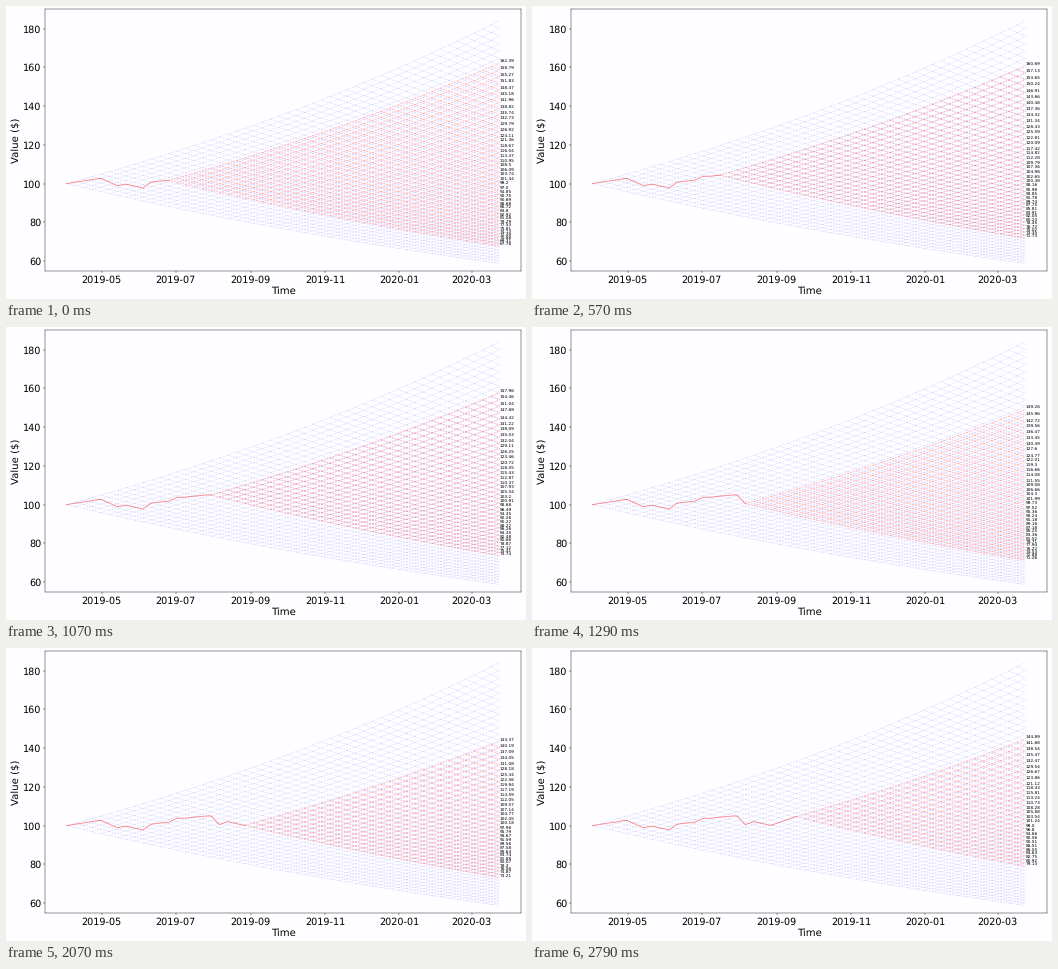
A matplotlib script that plays this animation: 520x293 px, repeating every 3 s.

```python
import numpy as np
import matplotlib.pyplot as plt
from matplotlib.animation import FuncAnimation
from matplotlib.collections import LineCollection

W, H, DPI = 520, 293, 37.5
WEEKS, FIRST = 51, 12
DRIFT = 0.04 / WEEKS
VOL = 0.08 / np.sqrt(WEEKS)

# Turning points of the price; weeks in between lie on straight lines.
TURNS = [(0, 100), (4, 102.8), (6, 98.95), (7, 99.8), (9, 97.8), (10, 100.8),
         (12, 101.75), (13, 103.75), (14, 103.918), (16, 104.822),
         (17, 105.088), (18, 100.5), (19, 102.064), (21, 100.066), (24, 104.83)]
PRICES = np.interp(np.arange(25), *zip(*TURNS))

# A new week arrives every 250 ms, the first one shortly after the start.
LOOP, TICK, PACE, LEAD = 3000, 30, 250, 240

plt.rcParams.update({"font.family": "DejaVu Sans", "text.hinting": "none"})


def value(price, step, ups):
    """Price at a lattice node after `step` weeks, `ups` of them upward."""
    return price * np.exp(step * DRIFT + (2 * ups - step) * VOL)


def lattice(week):
    """Both edges leaving every node, as an array of (start, end) points."""
    step, ups = np.tril_indices(WEEKS - week)
    x = 7 * (week + step)
    start = np.column_stack([x, value(PRICES[week], step, ups)])
    ends = [np.column_stack([x + 7, value(PRICES[week], step + 1, ups + up)])
            for up in (0, 1)]
    return np.concatenate([np.stack([start, end], axis=1) for end in ends])


fig = plt.figure(figsize=(W / DPI, H / DPI), dpi=DPI, facecolor="#fefdff")
left, right, top, bottom = 38.8, 515.3, 3.4, 264.8
ax = fig.add_axes([left / W, 1 - bottom / H, (right - left) / W, (bottom - top) / H],
                  facecolor="#fefdff")

days = 7 * WEEKS
ax.set_xlim(-0.05 * days, 1.05 * days)
ax.set_ylim(55, 190)

months = np.arange("2019-05", "2020-04", 2, dtype="datetime64[M]")
offsets = (months.astype("datetime64[D]") - np.datetime64("2019-04-02")).astype(int)
ax.set_xticks(offsets, [str(m) for m in months])
ax.set_yticks(range(60, 181, 20))
ax.tick_params(labelsize=18.5)
ax.tick_params(axis="x", pad=4.5)
ax.set_xlabel("Time", fontsize=19.4)
ax.set_ylabel("Value ($)", fontsize=19.4, labelpad=3)


def add_lattice(color, alpha):
    lines = LineCollection(lattice(0), colors=color, alpha=alpha,
                           linewidths=1, linestyles="--")
    ax.add_collection(lines, autolim=False)
    return lines


add_lattice("blue", 0.16)
forecast = add_lattice("red", 0.36)
path, = ax.plot([], [], color="red", alpha=0.5, lw=1.5)
labels = [ax.text(days, 100, "", fontsize=8.2) for _ in range(WEEKS - FIRST + 1)]


def draw(tick):
    week = FIRST + (tick * TICK + LEAD) // PACE
    ahead = WEEKS - week
    forecast.set_segments(lattice(week))
    path.set_data(7 * np.arange(week + 1), PRICES[:week + 1])
    for j, label in enumerate(labels):
        v = float(value(PRICES[week], ahead, j))
        label.set_visible(j <= ahead)
        label.set_y(v)
        label.set_text(str(round(v, 2)))
    return [forecast, path, *labels]


anim = FuncAnimation(fig, draw, frames=LOOP // TICK, interval=TICK,
                     init_func=lambda: draw(0), repeat=True, repeat_delay=0,
                     blit=False)
plt.show()
```
